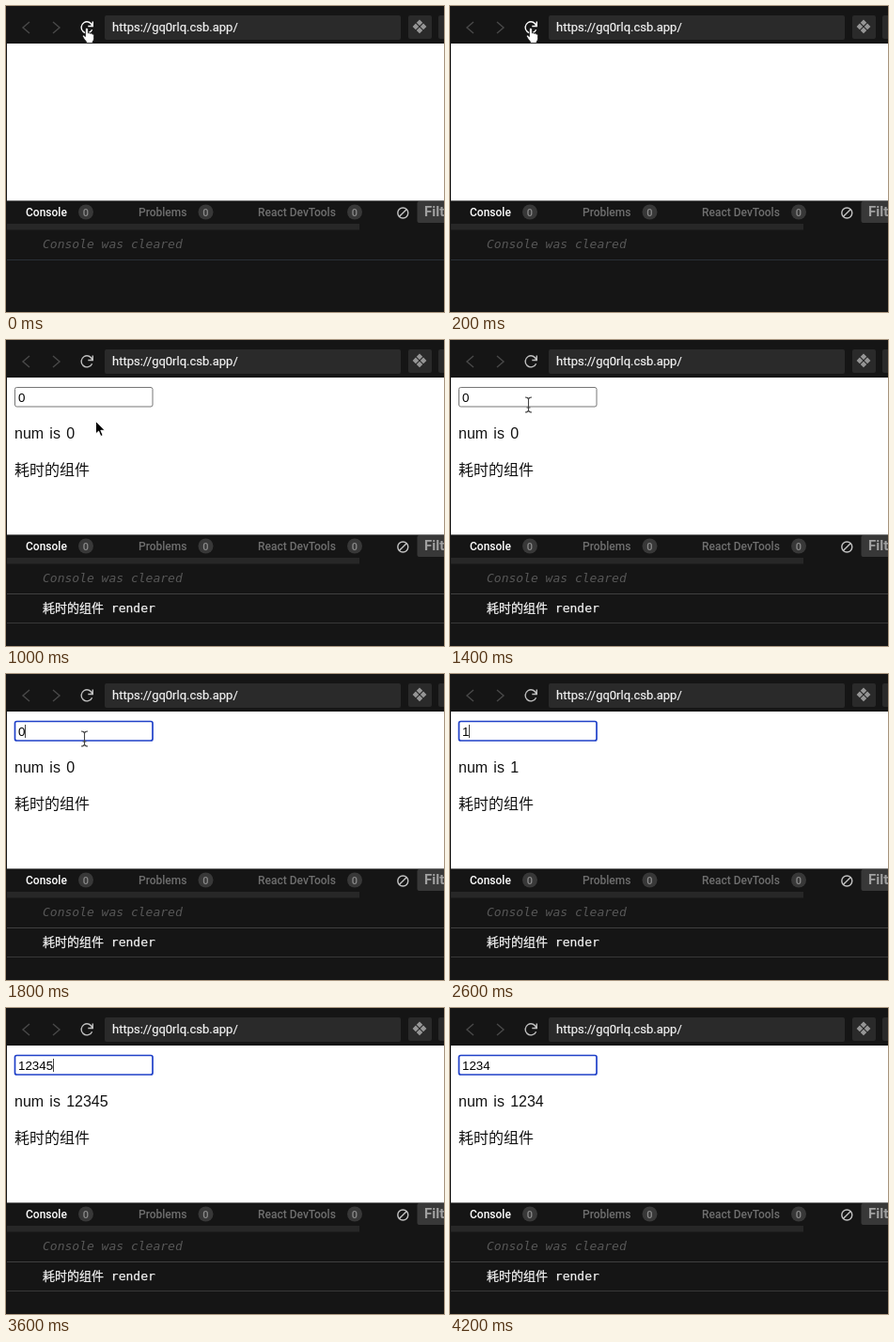
These frames come from a looping animation (466x326 px, 4400 ms). An HTML page:

```html
<!DOCTYPE html>
<html lang="zh">
<head>
<meta charset="utf-8">
<title>Render demo</title>
<style>
  html, body { margin: 0; width: 100%; height: 100%; overflow: hidden; background: #151515; }
  svg { display: block; }
  .ui { font: 500 12px Roboto, sans-serif; fill: #6f6f6f; }
  .url { font-size: 13px; font-weight: 400; fill: #f2f2f2; stroke: #f2f2f2; stroke-width: .2; }
  .filter { font-size: 15px; font-weight: 700; fill: #a0a0a0; }
  .page { font: 16px "Liberation Sans", "Noto Sans CJK SC", "Noto Sans CJK", sans-serif; word-spacing: 1.8px; fill: #111; }
  .value { font: 13.33px "Liberation Sans", sans-serif; }
  .log { font: 500 13px "DejaVu Sans Mono", "Noto Sans CJK SC", "Noto Sans CJK", monospace; fill: #f0f0f0; stroke: #f0f0f0; stroke-width: .25; }
  .cleared { font-style: italic; font-weight: 400; fill: #575757; stroke: none; }
  .badge { font-size: 11px; text-anchor: middle; fill: #8a8a8a; }
  .line { fill: none; stroke-width: 1.4; }
</style>
</head>
<body>
<svg width="466" height="326" viewBox="0 0 466 326">
  <!-- Browser bar -->
  <path class="line" stroke="#484848" d="M25 17l-7 6 7 6M50 17l7 6-7 6"/>
  <path id="reload" class="line" d="M92.300 16.500v5h-5M91.900 21.300A6 6 0 1 0 91.600 25.200"/>
  <g fill="#2a2a2a">
    <rect x="105" y="10" width="315" height="26" rx="2"/>
    <rect x="428" y="10" width="25" height="25" rx="2"/>
    <rect x="460" y="10" width="20" height="25" rx="2"/>
  </g>
  <text class="ui url" x="113" y="27">https://gq0rlq.csb.app/</text>
  <path fill="#969696" d="M440 14.500l3.300 3.300-3.300 3.300-3.300-3.300zM440 22.700l3.300 3.300-3.300 3.300-3.300-3.300zM435.900 18.600l3.300 3.300-3.300 3.300-3.300-3.300zM444.100 18.600l3.300 3.300-3.300 3.300-3.300-3.300z"/>

  <!-- Page -->
  <rect x="1" y="40" width="465" height="167" fill="#fff"/>
  <rect x="1" y="207" width="465" height="1" fill="#777"/>
  <g id="content">
    <rect id="field" x="9.5" y="50.5" width="146.500" height="20.500" rx="2" fill="#fff"/>
    <text id="value" class="value" x="13" y="65.500"></text>
    <rect id="caret" y="54" width="1" height="14" fill="#444"/>
    <text id="num" class="page" x="9" y="105"></text>
    <text class="page" x="9" y="144">耗时的组件</text>
  </g>

  <!-- Developer tools -->
  <g id="tabs" class="ui"></g>
  <g class="line" stroke="#c4c4c4">
    <circle cx="422.3" cy="220.5" r="5.5"/>
    <path d="M418.5 224.3l7.6-7.6"/>
  </g>
  <rect x="437.500" y="208" width="40" height="23" rx="2" fill="#383838"/>
  <text class="ui filter" x="445" y="224">Filter</text>
  <rect x="1" y="232" width="375" height="6.500" fill="#272727"/>
  <text class="log cleared" x="39" y="258">Console was cleared</text>
  <rect id="rule" x="1" y="270" width="465" height="1"/>
  <g id="log">
    <text class="log" x="39" y="290">耗时的组件 render</text>
    <rect x="1" y="301" width="465" height="1" fill="#383838"/>
  </g>

  <!-- Pointers, each with its hot spot at 0,0 -->
  <path id="hand" fill="#fff" stroke="#111" stroke-width=".8" d="M-1.6 1q0-1.8 1.5-1.8T1.4 1v4q1-1 2.1.3 1.2-.9 2.1.5 2-.3 2 1.6v3q0 2-1.4 3.6v1.6H-.6V14Q-3 11.5-4.4 8.5q-.4-1.5 1-1.5L-1.6 8.6z"/>
  <path id="arrow" fill="#000" stroke="#fff" stroke-width=".9" d="M0 0v13.5l3.1-2.9 2.2 5.4 2.3-1-2.3-5.2h4.3z"/>
  <path id="beam" class="line" stroke="#444" style="stroke-width:1.1" d="M-3.5-8q3 0 3.5 2 .5-2 3.500-2M0-6V6M-3.5 8q3 0 3.5-2 .5 2 3.5 2M-2 3h4"/>
</svg>
<script>
  const LOOP = 4400;
  const $ = id => document.getElementById(id);
  const show = (id, on) => { $(id).style.display = on ? '' : 'none'; };
  const paint = (id, name, value) => $(id).setAttribute(name, value);
  const latest = (steps, t) => steps.filter(([start]) => start <= t).pop();

  const typed = [[0, '0'], [2400, '1'], [2800, '12'], [3000, '123'], [3200, '1234'], [3600, '12345'], [4200, '1234']];
  const caret = [[0, false], [1600, true], [2000, false], [2400, true], [4000, false]];
  const pointer = [[0, 'hand', 86, 24], [1000, 'arrow', 95.5, 86.5], [1200, 'arrow', 89, 76], [1400, 'beam', 83.5, 69], [2400, '']];

  const tab = (label, x, badgeX, fill) => `
    <text x="${x}" y="223.5" style="fill:${fill}">${label}</text>
    <circle cx="${badgeX}" cy="219.5" r="8" fill="#383838"/>
    <text class="badge" x="${badgeX}" y="223.5">0</text>`;
  $('tabs').innerHTML = tab('Console', 21, 85, '#fff')
    + tab('Problems', 141, 212.5, '#6f6f6f')
    + tab('React DevTools', 268, 371, '#6f6f6f');

  function draw(now) {
    const t = now % LOOP;
    const loaded = t >= 400;
    const focused = t >= 1600;
    const value = latest(typed, t)[1];
    const [, kind, x, y] = latest(pointer, t);

    show('content', loaded);
    show('log', loaded);
    paint('rule', 'fill', loaded ? '#404040' : '#293036');
    paint('reload', 'stroke', t < 1000 ? '#fff' : '#c0c0c0');

    paint('field', 'stroke', focused ? '#1f40c8' : '#767676');
    paint('field', 'stroke-width', focused ? 1.7 : 1);
    $('value').textContent = value;
    $('num').textContent = 'num is ' + value;
    show('caret', latest(caret, t)[1]);
    paint('caret', 'x', Math.round(13 + value.length * 7.41));

    for (const id of ['hand', 'arrow', 'beam']) show(id, id === kind);
    if (kind) paint(kind, 'transform', `translate(${x} ${y})`);
    requestAnimationFrame(() => draw(performance.now()));
  }
  draw(0);
</script>
</body>
</html>
```
